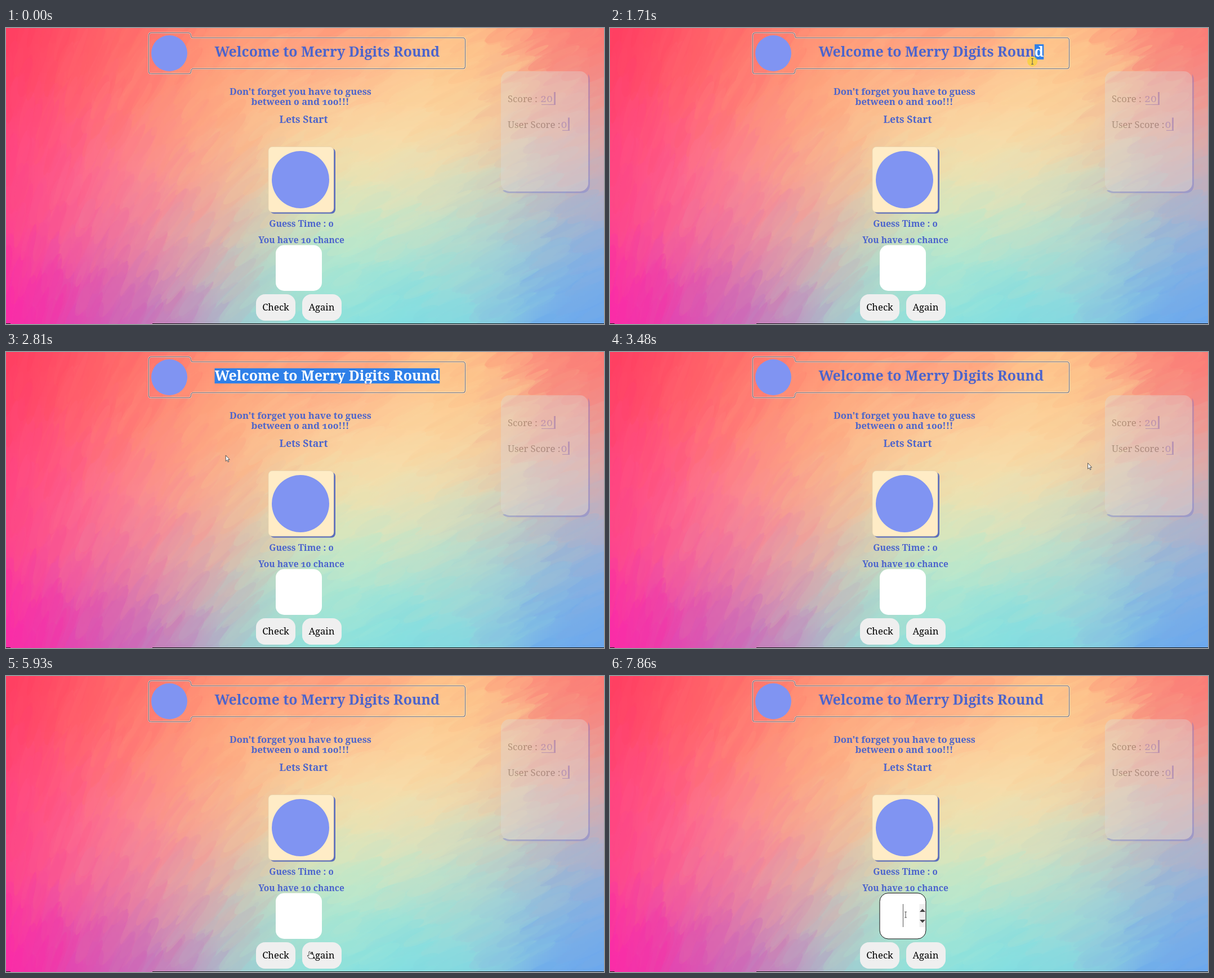
An HTML page with a canvas that plays this animation: 1062 by 527 pixels, repeating every 7.99 s.

```html
<!DOCTYPE html>
<html lang="en">
<head>
<meta charset="utf-8">
<title>Number riddle</title>
<style>
  html, body { margin: 0; width: 100%; height: 100%; overflow: hidden; }
  canvas, svg { position: absolute; left: 0; top: 0; width: 1062px; height: 527px; }
  svg { font-family: Georgia, "Noto Serif", serif; font-variant-numeric: oldstyle-nums; font-size: 16.7px; }
  .bold { font-weight: bold; fill: #4c64cc; text-anchor: middle; }
  .title { font-weight: bold; font-size: 24.9px; }
  .button { text-anchor: middle; }
</style>
</head>
<body>
<canvas id="paint" width="1062" height="527"></canvas>
<svg viewBox="0 0 1062 527">
  <defs>
    <path id="frame" d="M258 8H322Q328 8 328 13Q328 17 332 17H811Q815 17 815 22V67Q815 72 811 72H332Q328 72 328 77Q328 81 323 81H258Q253 81 253 77V13Q253 8 258 8Z" transform="translate(.5 .5)"/>
    <clipPath id="selClip"><rect id="selArea" y="29" height="27"/></clipPath>
  </defs>

  <!-- header -->
  <g fill="none">
    <use href="#frame" stroke="#fff" stroke-opacity=".6" stroke-width="2.6"/>
    <use href="#frame" stroke="#666870" stroke-width="1.1"/>
  </g>
  <circle cx="290" cy="45" r="32" fill="#8094f2"/>
  <text id="title" class="title" x="370.5" y="51" fill="#4c64cc">Welcome to Merry Digits Round</text>
  <g id="selection" clip-path="url(#selClip)">
    <rect x="360" y="29" width="440" height="27" fill="#2f80e8"/>
    <text class="title" x="370.5" y="51" fill="#fff">Welcome to Merry Digits Round</text>
  </g>

  <!-- messages -->
  <g class="bold">
    <text x="523" y="118.5" font-size="16.6">Don't forget you have to guess</text>
    <text x="522.5" y="137" font-size="16.6">between 0 and 100!!!</text>
    <text x="528.5" y="168.5" font-size="17.6">Lets Start</text>
    <text x="524.5" y="353.5" font-size="15.9">Guess Time : 0</text>
    <text x="524.5" y="382.5" font-size="15.5">You have 10 chance</text>
  </g>

  <!-- emblem card -->
  <rect x="469" y="214" width="116" height="116.5" rx="7" fill="#5b6dbd"/>
  <rect x="466" y="211.5" width="116" height="116.5" rx="7" fill="#ffecc6" stroke="#e4d2ad" stroke-width=".7"/>
  <circle cx="523" cy="270" r="51" fill="#8094f2"/>

  <!-- score panel -->
  <g id="panel">
    <path d="M1034 82Q1037 86 1037 94V278Q1037 294 1021 294H895Q886 294 882 289H1018Q1034 289 1034 275Z" fill="#6c74d4"/>
    <rect x="879" y="77" width="155" height="214" rx="15" fill="#dcdcdc"/>
    <g fill="#444">
      <text x="891" y="132">Score :</text>
      <text x="891" y="177.5">User Score :</text>
    </g>
    <g fill="#6c74d8">
      <text x="949" y="132" font-size="19">20</text>
      <text x="985.5" y="177.5" font-size="19">0</text>
      <path d="M973 114H976V137H951V135.7H973ZM998 159.5H1001V183H988V181.7H998Z"/>
    </g>
  </g>

  <!-- controls -->
  <rect id="field" x="479" y="386.5" width="82" height="81.5" rx="15" fill="#fff"/>
  <g id="spinner">
    <rect x="549.5" y="406" width="10.5" height="41" fill="#efefef"/>
    <path d="M550 420L555 414.5L560 420ZM550 434L555 439.5L560 434Z" fill="#444"/>
  </g>
  <path id="caret" d="M520.5 406V447" stroke="#555"/>
  <rect id="check" x="444" y="474" width="70" height="47" rx="16"/>
  <rect x="526" y="474" width="70" height="47" rx="16" fill="#efefef"/>
  <text class="button" x="479" y="503">Check</text>
  <text class="button" x="560.5" y="503">Again</text>
  <path d="M0 526.5H8M260 526.5H1062" stroke="#111"/>

  <!-- pointer -->
  <g id="pointer" stroke-linejoin="round">
    <circle id="press" r="9" fill="#f7d23a" opacity=".8"/>
    <path id="arrow" d="M.5 0V10.5L2.9 8.3L4.5 12L6.1 11.3L4.5 7.7H7.5Z" fill="#fff" stroke="#444" stroke-width=".9"/>
    <path id="beam" d="M-2 -5H2M0 -5V5M-2 5H2" fill="none" stroke="#555"/>
    <path id="hand" d="M0 0Q1.5 -1.5 2.5 .5V4Q4 3 5 4.5Q6.5 4 7 5.5Q8.5 5.5 8.5 7V9L7 12H1L-3 7Q-2.5 5.5 0 7Z" fill="#fff" stroke="#333" stroke-width=".9"/>
  </g>
</svg>

<script>
const $ = id => document.getElementById(id);
const W = 1062, H = 527, LOOP = 7990;

// spots of colour that melt into each other: x, y, colour
const spots = [
  [0, 0, 0xff3860], [0, 260, 0xff4080], [20, 527, 0xff26a8],
  [200, 40, 0xff6c6a], [190, 300, 0xff7494], [230, 510, 0xc060c0],
  [370, 170, 0xffae7c], [340, 360, 0xf6a89c], [460, 500, 0x84e0e0],
  [560, 0, 0xff8a72], [560, 190, 0xffe2a6], [560, 380, 0xc4f2cc],
  [740, 230, 0xffe6b4], [800, 100, 0xffc888], [820, 380, 0xa8dcd4],
  [700, 527, 0x70dce8], [1062, 0, 0xff7470], [1040, 220, 0xe4aca8],
  [1062, 400, 0x88b4e4], [1062, 527, 0x5aa0f4]
];

function colorAt(x, y) {
  let sum = 0, r = 0, g = 0, b = 0;
  for (const [sx, sy, c] of spots) {
    const w = Math.exp(-((x - sx) ** 2 + (y - sy) ** 2) / 22000);
    sum += w;
    r += w * (c >> 16);
    g += w * (c >> 8 & 255);
    b += w * (c & 255);
  }
  return `rgb(${r / sum},${g / sum},${b / sum})`;
}

function paintBackground() {
  const g = $('paint').getContext('2d');
  for (let y = 0; y < H; y += 4) {
    for (let x = 0; x < W; x += 4) {
      g.fillStyle = colorAt(x + 2, y + 2);
      g.fillRect(x, y, 4, 4);
    }
  }
  // petal-shaped strokes, upright on the left and flatter to the right
  let seed = 7;
  const rnd = () => (seed = seed * 16807 % 2147483647) / 2147483647;
  g.globalAlpha = .5;
  for (let i = 0; i < 1500; i++) {
    const x = rnd() * W, y = rnd() * H;
    const angle = -1.4 + Math.min(1, x / 600) * .95;
    g.fillStyle = colorAt(x + (rnd() - .5) * 50, y + (rnd() - .5) * 50);
    g.beginPath();
    g.ellipse(x, y, 24 + rnd() * 26, 5 + rnd() * 7, angle, 0, 7);
    g.fill();
  }
}

// pointer moves: begin, end, x and y reached
const origin = [986, 502];
const moves = [
  [190, 950, 490, 56], [1020, 1440, 773, 60], [1640, 2060, 372, 50],
  [2200, 2870, 390, 186], [3010, 3670, 938, 200], [4150, 4620, 576, 422],
  [4620, 4900, 488, 424], [4970, 5670, 474, 497], [5790, 5930, 538, 491],
  [5930, 6280, 674, 390], [6280, 6840, 560, 278], [7040, 7720, 525, 425]
];
const ease = p => p < .5 ? 2 * p * p : 1 - 2 * (1 - p) ** 2;

function pointerAt(t) {
  let [x, y] = origin;
  for (const [begin, end, toX, toY] of moves) {
    if (t < begin) break;
    const p = ease(Math.min(1, (t - begin) / (end - begin)));
    x += (toX - x) * p;
    y += (toY - y) * p;
  }
  return [x, y];
}

const within = (t, a, b) => t >= a && t < b;
const show = (id, on) => $(id).setAttribute('visibility', on ? 'visible' : 'hidden');
const set = (id, name, value) => $(id).setAttribute(name, value);

// boxes of everything the pointer reacts to, in stage pixels
const boxOf = el => {
  const { x, y, width, height } = el.getBBox();
  return { l: x, t: y, r: x + width, b: y + height };
};
const [check, again] = [...document.querySelectorAll('.button')].map(el => boxOf(el.previousElementSibling));
const checkBox = boxOf($('check'));
const againBox = { ...checkBox, l: 526, r: 596 };
const fieldBox = boxOf($('field'));
const panelBox = boxOf($('panel'));
const titleBox = { l: 371, t: 29, r: 772, b: 55 };
const textBoxes = [fieldBox, titleBox, ...[...document.querySelectorAll('.bold text')].map(boxOf)];

// the selection starts at the letter edge nearest to the pointer
function select(x) {
  const title = $('title'), last = title.getNumberOfChars() - 1;
  const left = i => title.getStartPositionOfChar(i).x;
  const right = i => title.getEndPositionOfChar(i).x;
  let i = 0;
  while (i < last && x > (left(i) + right(i)) / 2) i++;
  set('selArea', 'x', left(i));
  set('selArea', 'width', x > right(last) ? 0 : right(last) - left(i));
}

function draw(t) {
  const [x, y] = pointerAt(t);
  const over = box => t >= 190 && x >= box.l && x <= box.r && y >= box.t && y <= box.b;

  const dragging = within(t, 1440, 2200);
  const hand = over(checkBox) || over(againBox);
  const beam = !hand && (dragging || textBoxes.some(over));
  set('pointer', 'transform', `translate(${x} ${y})`);
  set('pointer', 'display', t < 190 ? 'none' : 'inline');
  show('press', dragging || within(t, 2870, 2940) || within(t, 7720, 7860));
  show('hand', hand);
  show('beam', beam);
  show('arrow', !hand && !beam);

  const selecting = within(t, 1640, 2870);
  show('selection', selecting);
  if (selecting) select(t < 2060 ? x : 0);

  const focused = t >= 7720;
  set('field', 'stroke', focused ? '#111' : 'none');
  show('caret', focused);
  show('spinner', over(fieldBox));
  set('check', 'fill', over(checkBox) ? '#e4e4e4' : '#efefef');
  set('panel', 'opacity', over(panelBox) ? .75 : .36);
}

paintBackground();
const begin = performance.now();
function tick() {
  draw((performance.now() - begin) % LOOP);
  requestAnimationFrame(tick);
}
tick();
</script>
</body>
</html>
```
